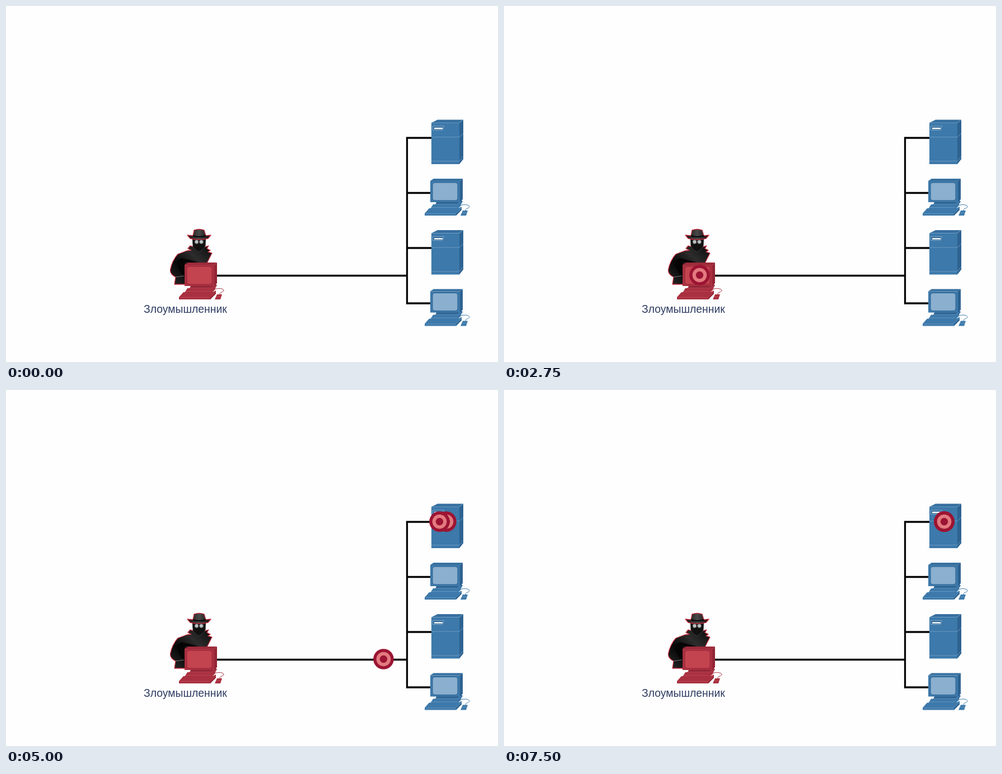
An HTML page for the animation above (8000 ms loop, 879 by 637 pixels).

```html
<!DOCTYPE html>
<html lang="ru">
<head>
<meta charset="utf-8">
<style>
  html, body { margin: 0; width: 100%; height: 100%; overflow: hidden; background: #fefefe; }
  svg { display: block; width: 879px; height: 637px; }
  .blue { --front: #3d79aa; --side: #2d6291; --top: #37709f; --glass: #8aafcf; --edge: #6c9cc4; --rim: #2c618f; }
  .red { --front: #a93040; --side: #942637; --top: #9c2a3a; --glass: #c3444f; --edge: #be4b58; --rim: #97283a; }
  .front { fill: var(--front); }
  .side { fill: var(--side); }
  .top { fill: var(--top); }
  .glass { fill: var(--glass); stroke: var(--rim); }
  .edge { fill: none; stroke: var(--edge); }
  .cable { fill: none; stroke: var(--front); }
  text { font: 19.35px "Liberation Sans", Arial, sans-serif; fill: #2f3d63; text-anchor: middle; }
</style>
</head>
<body>
<svg viewBox="0 0 879 637">
  <defs>
    <linearGradient id="coat" x1="0" y1="1" x2="1" y2="0">
      <stop offset="0" stop-color="#2a2a2a"/>
      <stop offset=".35" stop-color="#080808"/>
      <stop offset=".65" stop-color="#2c2c2c"/>
      <stop offset="1" stop-color="#0b0b0b"/>
    </linearGradient>
    <linearGradient id="felt">
      <stop offset="0" stop-color="#111"/>
      <stop offset=".5" stop-color="#484848"/>
      <stop offset="1" stop-color="#0c0c0c"/>
    </linearGradient>
    <g id="server">
      <path class="top" d="M0 6L11 0.500H57L50 6Z"/>
      <path class="side" d="M50 6L57 0.500V71L50 80Z"/>
      <path class="front" d="M0 6H50V80H0Z"/>
      <path class="edge" d="M0 31.500H50L57 25M0 74.500H50L57 66M1 6H50L56 1" stroke-width=".9"/>
      <path d="M2.500 12H22.500L20 19H2.500Z" fill="#2f6696" stroke="#8fb4d2" stroke-width=".9"/>
      <path d="M5 16H20" stroke="#f6fafd" stroke-width="2.600"/>
    </g>
    <g id="pc">
      <path class="side" d="M11 41H50L55 38L58 41L52 48H9Z"/>
      <path class="front" d="M5 46H48L57 41L54 49L49 54H0Z"/>
      <path class="edge" d="M8 45.500H48L55 41M2 51.500H48" stroke-width=".8"/>
      <path class="top" d="M0 4L6 0H58L53 4Z"/>
      <path class="side" d="M53 4L58 0V37L53 42Z"/>
      <path class="front" d="M0 4H53V42H0Z"/>
      <rect class="glass" x="4" y="7" width="45" height="32" rx="4"/>
      <path class="front" d="M-2 53H50L56 50V55L46 66H-10V62Z"/>
      <path class="edge" d="M-8 62.500H45L55 53" stroke-width=".8"/>
      <path class="side" d="M46 62L56 53V56L46 66Z"/>
      <path class="cable" d="M53 48C62 45 70 47 70 50S62 53 63 57" stroke-width="1"/>
      <path class="front" d="M58 57H67L64 66H54Z"/>
      <path class="edge" d="M56.500 61H65" stroke-width=".8"/>
    </g>
    <g id="dot">
      <circle r="18.300" fill="#9c1433"/>
      <circle r="12.800" fill="#e37a7f"/>
      <circle r="6.700" fill="#9c1433"/>
    </g>
  </defs>

  <path d="M376 482.500H716.500M760 236H716.500V532H760M716.500 334.500H760M716.500 433H760"
        fill="none" stroke="#060606" stroke-width="3.300"/>

  <g class="blue">
    <use href="#server" x="760" y="203"/>
    <use href="#pc" x="758" y="309"/>
    <use href="#server" x="760" y="400.500"/>
    <use href="#pc" x="758" y="506.500"/>
  </g>

  <g stroke="#c62f3f" stroke-width="1.300" stroke-linejoin="round">
    <path fill="url(#coat)" d="M329 429L336 431H355L362 429L359 434L365 437L361 440L368 442L359 460V498H301L303 485Q293 480 293.500 472Q297 455 307 444L323 438L331 437L325 434Z"/>
    <path fill="#050505" stroke="none" d="M305 456L314 451L330 455L344 459H319V484L312 477L307 467Z"/>
    <path d="M303 485L318 483" stroke="#777" stroke-width="1"/>
    <path fill="#111" stroke="#444" stroke-width=".8" d="M333 416H357L356 430Q351 438 345 440Q337 437 334 430Z"/>
    <path fill="url(#felt)" d="M334 411L336 401Q345 398 354 401L357 411L366 410L361 416Q345 420 329 416L324 410Z"/>
    <path d="M334 411Q345 415 357 411" fill="none" stroke="#050505" stroke-width="2"/>
    <g fill="#b9c0c0" stroke="#555" stroke-width="1">
      <circle cx="340.500" cy="422" r="3.500"/>
      <circle cx="349" cy="422" r="3.500"/>
    </g>
  </g>
  <use class="red" href="#pc" x="319" y="459"/>
  <text x="320.400" y="548.500">Злоумышленник</text>
  <g id="dots"></g>
</svg>
<script>
const LOOP = 8000, STEP = 250;
const starts = [2730, 3500, 4250, 4980];
// distance along the cable after each step
const travel = [0, 62, 196, 330, 428, 549, 676, 688];
const layer = document.getElementById("dots");

const dots = starts.map(() => {
  const dot = document.createElementNS("http://www.w3.org/2000/svg", "use");
  dot.setAttribute("href", "#dot");
  return layer.appendChild(dot);
});

function distance(age) {
  const pos = Math.min(Math.max(age / STEP, 0), travel.length - 1);
  const i = Math.min(Math.floor(pos), travel.length - 2);
  return travel[i] + (travel[i + 1] - travel[i]) * (pos - i);
}

// right along the trunk, up the riser, right into the server
function place(d) {
  const across = Math.min(d, 371);
  const up = Math.min(Math.max(d - 371, 0), 246);
  return [344.5 + across + Math.max(d - 617, 0), 481.5 - up];
}

function draw(now) {
  const t = Math.floor(now % LOOP / STEP) * STEP;
  dots.forEach((dot, i) => {
    const age = t - starts[i];
    const fade = i ? +(age > 100) : Math.min(Math.max((t - 1250) / 500, 0), 1);
    const [x, y] = place(distance(age));
    dot.setAttribute("opacity", fade);
    dot.setAttribute("transform", `translate(${x} ${y})`);
  });
}

const begin = performance.now();
function tick() {
  draw(performance.now() - begin);
  requestAnimationFrame(tick);
}
tick();
</script>
</body>
</html>
```
